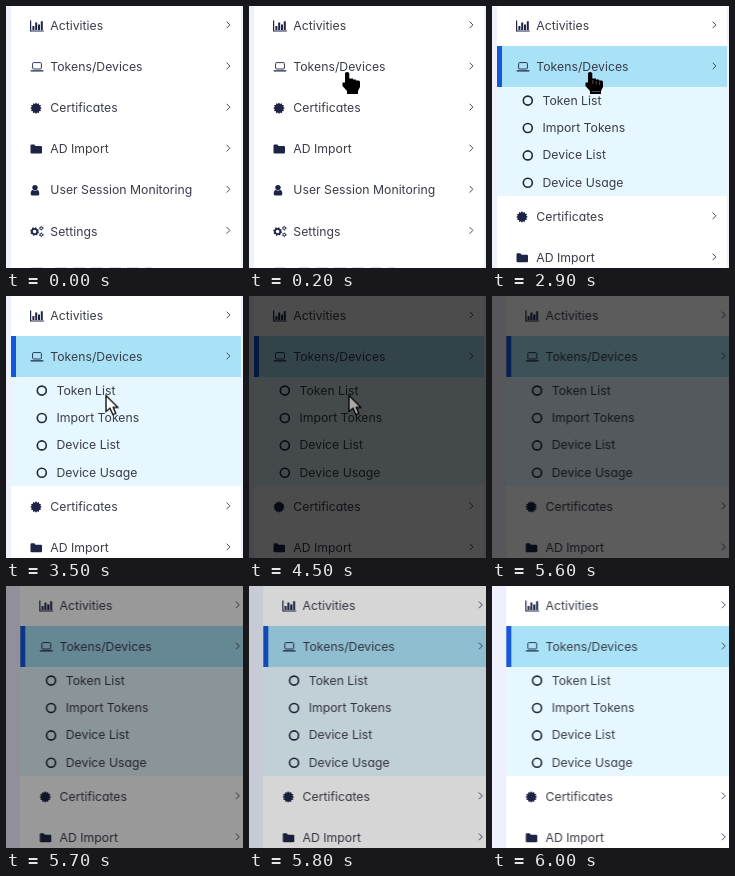
Animation, 237 px wide and 262 px high, one loop 7400 ms. Source, as an HTML page:

```html
<!DOCTYPE html>
<html lang="en">
<head>
<meta charset="utf-8">
<title>Sidebar menu</title>
<style>
  html, body { margin: 0; width: 100%; height: 100%; overflow: hidden; background: #fff; }
  svg { display: block; width: 100%; height: 100%; }
  text { font: 400 12.25px Inter, "Open Sans", sans-serif; font-feature-settings: "cv11"; fill: #3a3c4a; }
  .icon { fill: #1d2445; stroke: none; }
  .line { fill: none; stroke: #1d2445; stroke-width: 1.2; }
  .chevron { fill: none; stroke: #4a4c58; stroke-width: 1; }
  .ring { fill: none; stroke: #22263c; stroke-width: 1.6; }
</style>
</head>
<body>
<svg id="stage" viewBox="0 0 237 262" preserveAspectRatio="none"></svg>
<script>
const LOOP = 7400;
const ROW = 41.1;

// Icons are centred on the origin.
const gear = (x, y, r, w, teeth) => {
  const dash = Math.PI * (r + w / 2) / teeth;
  return `<circle class="line" cx="${x}" cy="${y}" r="${r}" style="stroke-width:${w}"/>
    <circle class="line" cx="${x}" cy="${y}" r="${r + w / 2}" style="stroke-width:${w * 0.8}" stroke-dasharray="${dash}"/>`;
};

const burst = Array.from({ length: 24 }, (_, i) => {
  const r = i % 2 ? 4.4 : 5.8, a = i * Math.PI / 12;
  return `${(r * Math.cos(a)).toFixed(2)},${(r * Math.sin(a)).toFixed(2)}`;
}).join(' ');

const icons = {
  chart: `<path class="line" d="M-6.4-5.5V5H6.8"/>
    <path class="icon" d="M-4.6 0h2v4h-2zM-1.8-3.4h2v7.4h-2zM1-1.4h2v5.4h-2zM3.8-4.8h2v8.8h-2z"/>`,
  laptop: `<rect class="line" x="-4.4" y="-4.5" width="8.8" height="6.4" rx="1" style="stroke-width:.9"/>
    <path class="icon" d="M-6.4 3.2H6.4V4Q6.2 4.5 5.5 4.5H-5.5Q-6.2 4.5-6.4 4Z"/>`,
  badge: `<polygon class="icon" points="${burst}" transform="translate(-1)"/>`,
  folder: `<path class="icon" d="M-6.5-3.8Q-6.5-4.8-5.5-4.8H-2.7L-1.4-3.3H3.9Q5-3.3 5-2.2V3.2Q5 4.3 3.9 4.3H-5.4Q-6.5 4.3-6.5 3.2Z"/>`,
  user: `<circle class="icon" cx="-2" cy="-2.8" r="2.7"/>
    <path class="icon" d="M-6.3 3.6Q-6.3-.3-4-.4Q-2 1.2 0-.4Q2.3-.3 2.3 3.6Q2.3 5.2.7 5.2H-4.7Q-6.3 5.2-6.3 3.6Z"/>`,
  cogs: gear(-2.4, 0, 2.7, 1.8, 8) + gear(4.3, -3.3, 1.3, 1, 6) + gear(4.3, 3.3, 1.3, 1, 6)
};

const items = [
  ['Activities', 'chart'], ['Tokens/Devices', 'laptop'], ['Certificates', 'badge'],
  ['AD Import', 'folder'], ['User Session Monitoring', 'user'], ['Settings', 'cogs']
];
const subItems = ['Token List', 'Import Tokens', 'Device List', 'Device Usage'];

const menuRow = ([label, icon], y) => `<g transform="translate(0 ${y})">
  <g transform="translate(31 0)">${icons[icon]}</g>
  <text x="44.3" y="4">${label}</text>
  <path class="chevron" d="M220.6-4.4L223.9-1.1L220.6 2.2"/></g>`;

const subRow = (label, i) => `<g transform="translate(0 ${94.6 + 27.4 * i})">
  <circle class="ring" cx="35.8" cy="0" r="4.5"/><text x="50.5" y="4">${label}</text></g>`;

const panel = `<rect x="-12" width="260" height="262" fill="#eef0fe"/>
  <rect x="5" width="230" height="262" fill="#fff"/>`;

const closedMenu = panel +
  items.map((item, i) => menuRow(item, 20 + ROW * i)).join('') +
  `<path d="M25 261.6H37M49 261.6H146" stroke="#dcdde4" stroke-dasharray="12 6" fill="none"/>`;

const openMenu = panel +
  `<rect x="5" y="40" width="230" height="41" fill="#a9e2f7"/>
   <rect x="5" y="81" width="230" height="109" fill="#e6f7ff"/>
   <rect x="5" y="40" width="5" height="41" fill="#1459dc"/>` +
  items.slice(0, 4).map((item, i) => menuRow(item, 20 + ROW * i + (i > 1 ? 108.7 : 0))).join('') +
  subItems.map(subRow).join('');

document.getElementById('stage').innerHTML = `
  <g id="closed">${closedMenu}</g>
  <g id="open">${openMenu}</g>
  <rect id="shade" width="237" height="262" fill="#000"/>
  <g id="hand">
    <path d="M-2 1Q0-1 2.3 1V6.5H6V7.5H9V8.5H12Q13 9 13 10.5V15L11 19V22H0V19L-4.5 14V10.5H-2Z"/>
    <path id="creases" d="M2.8 8V12M6.3 9V12.5M9.5 10V13M1.5 19.5H10" fill="none" stroke="#79686b" stroke-width=".7"/>
  </g>
  <path id="arrow" d="M0 0V16L4 12.8L6.8 19L9.8 17.8L7.2 11.8H11.8Z" stroke="#000" stroke-width="1.3"/>`;

// Each step [time, value] holds until the next one.
function play(id, property, steps) {
  const frames = steps.map(([ms, value]) => ({
    offset: ms / LOOP, [property]: value, easing: 'steps(1, end)'
  }));
  frames.push({ offset: 1, [property]: steps[steps.length - 1][1] });
  document.getElementById(id).animate(frames, { duration: LOOP, iterations: Infinity });
}
const at = (x, y) => `translate(${x}px, ${y}px)`;

play('open', 'opacity', [[0, 0], [2900, 1]]);
play('open', 'transform', [[0, at(0, 0)], [4600, at(9.3, 0)]]);
play('shade', 'opacity', [
  [0, 0], [4500, .7], [4600, 1], [5200, .98], [5300, .94], [5400, .87],
  [5500, .77], [5600, .64], [5700, .4], [5800, .16], [5900, .04], [6000, 0]
]);
play('hand', 'opacity', [[0, 0], [100, 1], [3300, 0]]);
play('hand', 'transform', [[0, at(94, 0)], [200, at(98, 66)], [3100, at(98, 69)], [3200, at(98, 76)]]);
play('creases', 'opacity', [[0, 0], [2900, 1]]);
play('arrow', 'opacity', [[0, 0], [3300, 1], [4600, 0]]);
play('arrow', 'fill', [[0, '#fff'], [4500, '#aaa']]);
play('arrow', 'transform', [[0, at(100, 86)], [3400, at(100, 94)], [3500, at(100, 99.5)]]);
</script>
</body>
</html>
```
